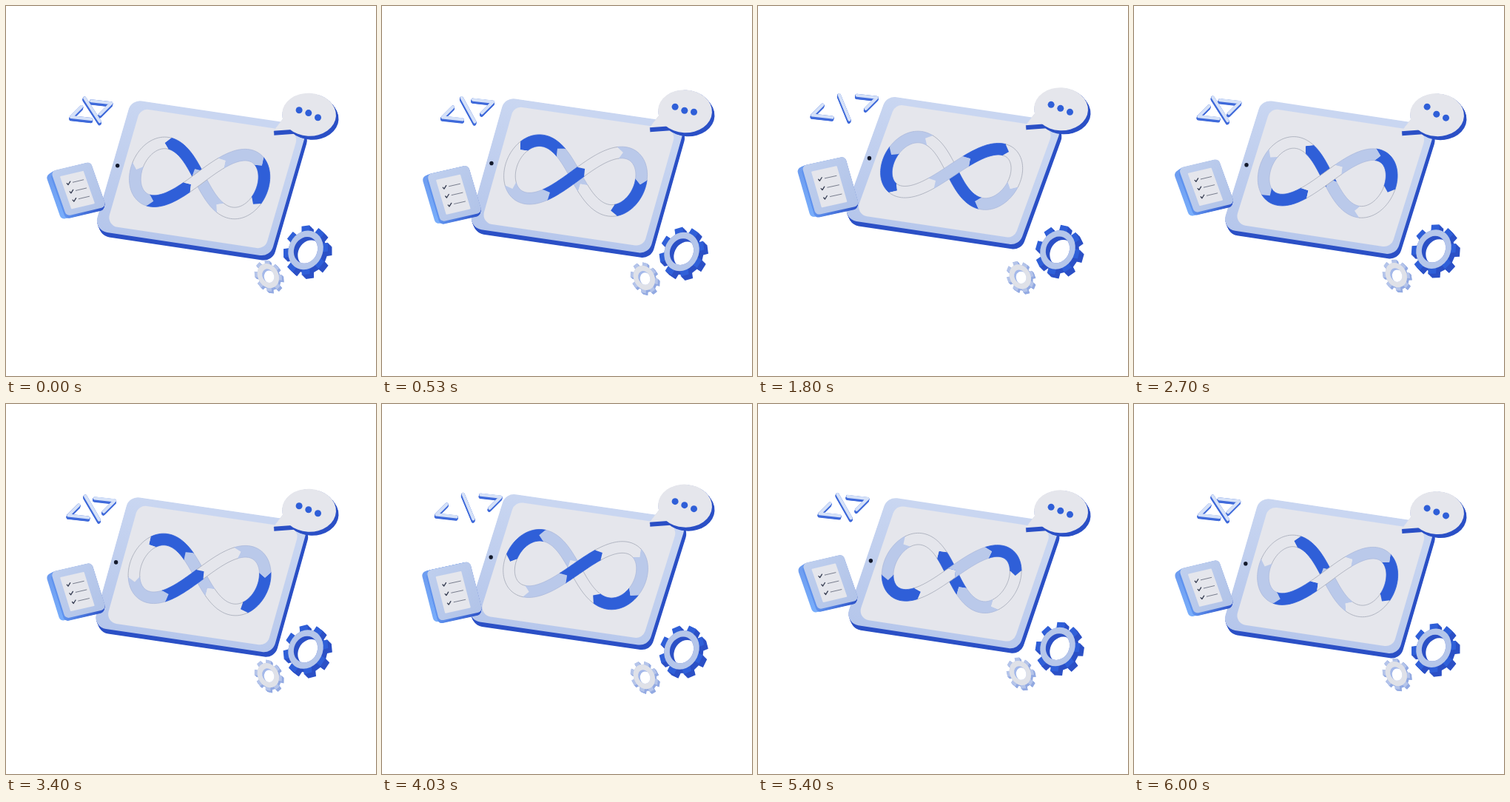
These frames come from a looping animation (500 by 500 pixels, 6030 ms). An HTML page with a canvas:

```html
<!DOCTYPE html>
<html lang="en">
<head>
<meta charset="utf-8">
<title>Floating tablet</title>
<style>
html, body { margin: 0; width: 100%; height: 100%; overflow: hidden; background: #fff; }
canvas { display: block; }
</style>
</head>
<body>
<canvas id="stage" width="500" height="500"></canvas>
<script>
const c = document.getElementById('stage').getContext('2d');
const PERIOD = 3015, TAU = Math.PI * 2;
const DARK = '#2f5fd8', EDGE = '#2b50c6', LIGHT = '#bac9ea', PAPER = '#e5e6ec';

// Everything floats on one slow wave, given by its two quadratures
let phase = 0, lift = 0, sway = 0;
const wave = (mean, a, b) => mean + a * lift + b * sway;

// Parallelogram around a centre; returns a map from (u, v) in 0..1 to the stage
const plane = (cx, cy, ux, uy, vx, vy) => (u, v) =>
  [cx + (u - 0.5) * ux + (v - 0.5) * vx, cy + (u - 0.5) * uy + (v - 0.5) * vy];

function fillPlane(at, radius, fill, l = 0, t = 0, r = 1, b = 1) {
  const corners = [at(l, t), at(r, t), at(r, b), at(l, b)];
  c.beginPath();
  c.moveTo(...at(l, (t + b) / 2));
  corners.forEach((pt, i) => c.arcTo(...pt, ...corners[(i + 1) % 4], radius));
  c.closePath();
  c.fillStyle = fill;
  c.fill();
}

function polygon(points, fill) {
  c.beginPath();
  points.forEach(pt => c.lineTo(...pt));
  c.closePath();
  c.fillStyle = fill;
  c.fill();
}

function line(points, color, width) {
  c.beginPath();
  points.forEach(pt => c.lineTo(...pt));
  c.strokeStyle = color;
  c.lineWidth = width;
  c.stroke();
}

function ellipse(x, y, rx, ry, tilt, fill) {
  c.beginPath();
  c.ellipse(x, y, rx, ry, tilt, 0, TAU);
  c.fillStyle = fill;
  c.fill();
}

function extrude(dx, dy, draw) {
  for (let i = 8; i > 0; i--) {
    c.save();
    c.translate(dx * i / 8, dy * i / 8);
    draw();
    c.restore();
  }
}

function blend(a, b, from, to) {
  const g = c.createLinearGradient(...a, ...b);
  g.addColorStop(0, from);
  g.addColorStop(1, to);
  return g;
}

function drawCode() {
  const spread = Math.cos(TAU * (phase - 0.47)), drift = -1.5 * sway;
  const lx = 93.5 - 8.8 * spread, ly = 135 + drift;
  const rx = 126 + 11 * spread, ry = 124.3 - 3 * spread + drift;
  const strokes = [
    [[lx, ly], [lx - 14, ly + 14], [lx + 13, ly + 17]],
    [[rx, ry], [rx + 27, ry + 3], [rx + 12, ry + 18]],
    [[108.2 + 2 * spread, 122.2 - 1.2 * spread + drift], [124.8 - 2 * spread, 155 + drift]]];
  c.lineCap = c.lineJoin = 'round';
  for (const s of strokes) {
    extrude(-0.5, 3, () => line(s, '#3f6ada', 4.6));
    line(s, '#d5e1f8', 4.2);
  }
}

function drawTablet(at) {
  extrude(3, 6.5, () => fillPlane(at, 16, EDGE));
  fillPlane(at, 16, blend(at(0, 0), at(0, 1), '#c9d6f1', '#b5c6eb'));
  fillPlane(at, 13, PAPER, 0.062, 0.055, 0.96, 0.95);
  ellipse(...at(0.028, 0.5), 2.7, 2.8, 0, '#141a2c');
}

function drawInfinity(plane) {
  const N = 360, k = 0.05, half = 7.8, tip = 7;
  const pts = [], dist = [0];
  for (let i = 0; i <= N; i++) {
    const t = i / N * TAU;
    pts.push(plane(0.493 + 0.357 * (Math.sin(t) - k * Math.sin(3 * t)) / (1 + k),
      0.5 - 0.221 * Math.sin(2 * t)));
    if (i) dist.push(dist[i - 1] + Math.hypot(pts[i][0] - pts[i - 1][0], pts[i][1] - pts[i - 1][1]));
  }
  const total = dist[N], seg = total / 9;

  // Point at a distance along the band, moved sideways
  const at = (s, side) => {
    s = (s % total + total) % total;
    const hi = Math.max(1, dist.findIndex(d => d >= s)), lo = hi - 1;
    const [x0, y0] = pts[lo], [x1, y1] = pts[hi], len = dist[hi] - dist[lo];
    const f = (s - dist[lo]) / len, dx = (x1 - x0) / len, dy = (y1 - y0) / len;
    return [x0 + (x1 - x0) * f - dy * side, y0 + (y1 - y0) * f + dx * side];
  };

  // The strip rising to the right passes over the other
  const fromCross = s => Math.abs(s - total * Math.round(s / total));
  const parts = Array.from({ length: 9 }, (_, i) => {
    const start = (i - 0.38 + 3 * phase) * seg;
    return { start, color: i % 3, far: fromCross(start + seg / 2) };
  }).sort((a, b) => b.far - a.far);

  c.lineJoin = 'round';
  for (const { start, color } of parts) {
    const left = [], right = [];
    for (let j = 0; j <= 24; j++) {
      const s = start + seg * j / 24;
      left.push(at(s, -half));
      right.unshift(at(s, half));
    }
    polygon([...left, at(start + seg + tip, 0), ...right, at(start + tip, 0)],
      [PAPER, LIGHT, DARK][color]);
    const rim = ['#a4a9b6', '#abb9dc', DARK][color];
    line(left, rim, 0.8);
    line(right, rim, 0.8);
  }
}

function drawCard() {
  const at = plane(98, wave(247, 4.6, -5.2), wave(56.7, 2.5, 1.5), -12.8,
    wave(19.6, -2.2, 0), wave(64.5, 4, 1.5));
  extrude(-7, wave(3.5, -1.5, 0), () => fillPlane(at, 6, blend(at(0, 0), at(0, 1), '#6d9cf0', '#79aefb')));
  extrude(-1, 4, () => fillPlane(at, 6, blend(at(0, 1), at(1, 1), '#5f92ee', EDGE)));
  fillPlane(at, 6, blend(at(0, 0), at(1, 1), '#bfcfee', '#b1c3e8'));
  fillPlane(at, 1, PAPER, 0.17, 0.15, 0.76, 0.88);
  c.lineCap = 'round';
  for (let row = 0; row < 3; row++) {
    const v = 0.335 + 0.185 * row, [x, y] = at(0.31, v);
    line([[x - 2, y], [x - 0.3, y + 2], [x + 2.5, y - 2.5]], '#343b50', 1.3);
    line([at(0.42, v), at(0.69, v)], '#6b7182', 0.9);
  }
}

function drawBubble() {
  const x = 409.5, y = wave(142, -5, -1.7);
  const tail = [[x - 35, y + 5], [x - 48, y + 22], [x - 20, y + 20]];
  extrude(0.5, 6, () => polygon(tail, EDGE));
  extrude(3.5, 5, () => ellipse(x, y, 36.5, 29, 0.05, EDGE));
  ellipse(x, y, 36.5, 29, 0.05, PAPER);
  polygon(tail, PAPER);
  for (let i = 0; i < 3; i++) {
    const hop = (phase - 0.83 - 0.16 * i + 2) % 1 / 0.13;
    const jump = hop < 1 ? 5 * Math.sin(Math.PI * hop) : 0;
    ellipse(x + 12.7 * (i - 1) - 0.7, y - 1 + 5 * (i - 1) - jump, 4.5, 4.5, 0, DARK);
  }
}

function drawGear(x, y, { rx, ry, tilt, hole, spin, depth, side, teeth, ring, wall }) {
  const place = (r, a) => {
    const px = r * rx * Math.cos(a), py = r * ry * Math.sin(a);
    return [x + px * Math.cos(tilt) - py * Math.sin(tilt),
      y + px * Math.sin(tilt) + py * Math.cos(tilt)];
  };
  const body = [];
  for (let i = 0; i < 8; i++) {
    const a = spin + i * TAU / 8;
    body.push(place(1, a - 0.23), place(1.28, a - 0.18), place(1.28, a + 0.18), place(1, a + 0.23));
  }
  extrude(depth, depth, () => polygon(body, side));
  polygon(body, teeth);
  ellipse(x, y, rx, ry, tilt, ring);
  ellipse(x, y, rx * hole, ry * hole, tilt, wall);
  c.save();
  c.clip();
  ellipse(x + depth, y + depth * 0.8, rx * hole, ry * hole, tilt, '#fff');
  c.restore();
}

function drawGears() {
  const spin = (0.34 - phase) * TAU / 8;
  drawGear(405, wave(330.3, 1.8, -1.3), {
    rx: 23, ry: 27, tilt: 0.45, hole: 0.68, spin, depth: 5.5,
    side: EDGE, teeth: DARK, ring: '#b5c6ea', wall: EDGE });
  drawGear(354.3, wave(366, 2.5, -0.7), {
    rx: 13.8, ry: 17.3, tilt: -0.5, hole: 0.56, spin: -spin, depth: 2.7,
    side: '#93aae2', teeth: '#b4c4ea', ring: '#dfe1e8', wall: '#a3b8ea' });
}

function frame() {
  phase = performance.now() % PERIOD / PERIOD;
  lift = Math.cos(TAU * (phase - 0.38));
  sway = Math.sin(TAU * (phase - 0.38));
  c.clearRect(0, 0, 500, 500);
  drawCode();
  const tablet = plane(263.3, wave(227, -4.3, -3.7), wave(240.5, 5, -2.5), 35.7,
    wave(-55, 0, -5.5), wave(172, -2, -5));
  drawTablet(tablet);
  drawInfinity(tablet);
  drawCard();
  drawBubble();
  drawGears();
  requestAnimationFrame(frame);
}
frame();
</script>
</body>
</html>
```
